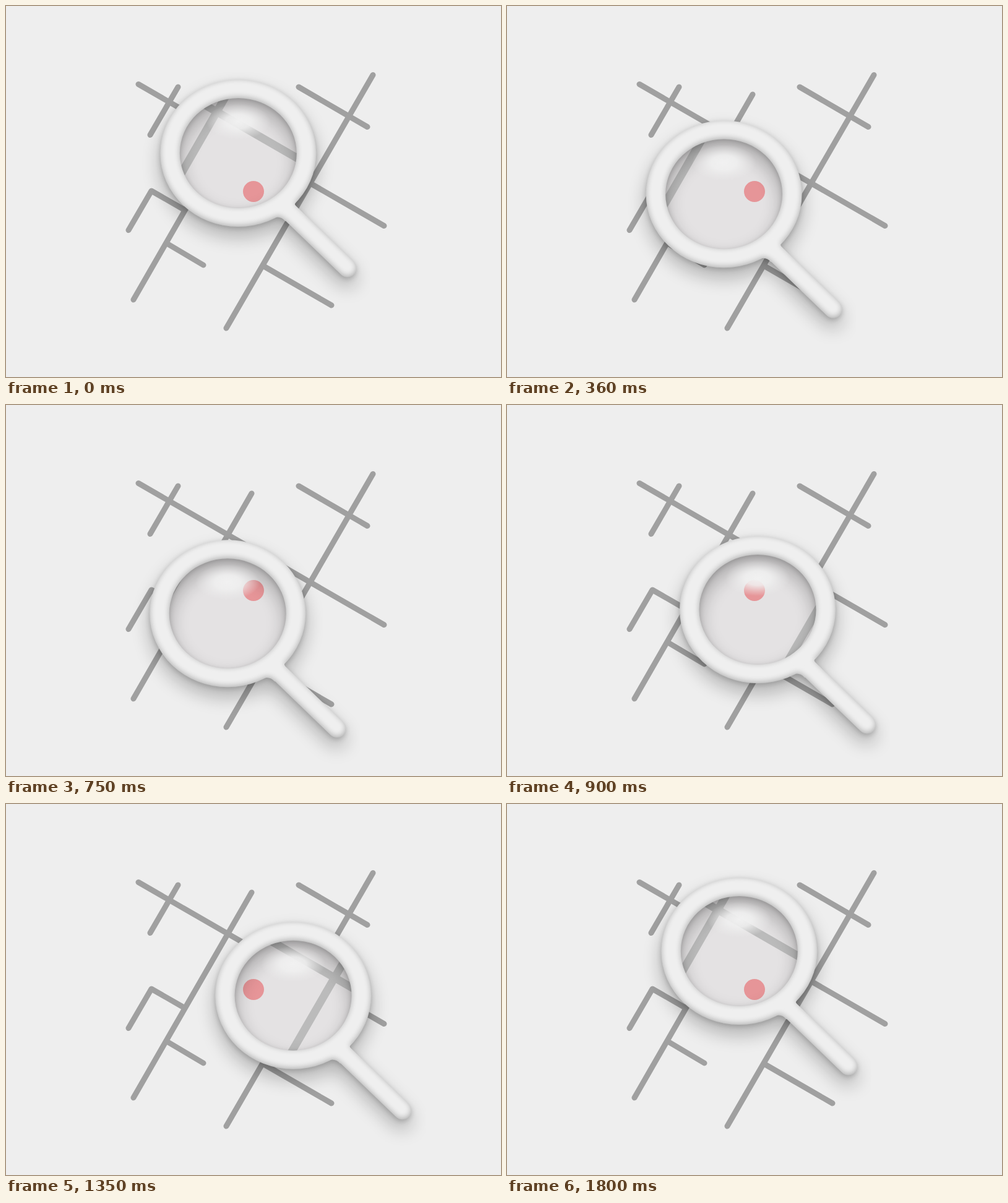
Animation, 800 px wide and 600 px high, one loop 2250 ms. Source, as an HTML page without scripts:

```html
<!DOCTYPE html>
<html lang="en">
<head>
<meta charset="utf-8">
<title>Map search</title>
<style>
  @property --t { syntax: "<number>"; inherits: true; initial-value: 0; }

  html, body { margin: 0; width: 100%; height: 100%; overflow: hidden; background: #eee; }

  /* The lens eases through three stops; a, b and c are the eased progress of each leg. */
  svg {
    display: block; width: 800px; height: 600px;
    animation: clock 2250ms steps(75) -2ms infinite;
    --p: clamp(0, var(--t) / 600, 1);
    --q: clamp(0, (var(--t) - 600) / 615, 1);
    --r: clamp(0, (var(--t) - 1215) / 585, 1);
    --a: (var(--p) * var(--p) * (3 - 2 * var(--p)));
    --b: (var(--q) * var(--q) * (3 - 2 * var(--q)));
    --c: (var(--r) * var(--r) * (3 - 2 * var(--r)));
    --x: calc(1px * (375.3 - 38.1 * var(--a) + 140.8 * var(--b) - 102.7 * var(--c)));
    --y: calc(1px * (238 + 102.2 * var(--a) - 19.2 * var(--b) - 83 * var(--c)));
  }
  @keyframes clock { from { --t: 0; } to { --t: 2250; } }

  .lens { transform: translate(var(--x), var(--y)); }
  .fixed { transform: translate(calc(-1 * var(--x)), calc(-1 * var(--y))); }
  .roads { fill: none; stroke-width: 9; stroke-linecap: round; stroke-linejoin: round; }
</style>
</head>
<body>
<svg viewBox="0 0 800 600">
  <defs>
    <path id="roads" class="roads" d="M214 126.5L611 355.5M278 131L233 208.5M397 143L206 475M473 131L584 195.5
      M593 111.5L356 521M198 362.5L235 299L289 330M260 384L319 419M416 420.5L526 484"/>
    <g id="frame">
      <path fill-rule="evenodd" d="M-126 0A126 119 0 0 1 126 0A126 119 0 0 1 -126 0Z
        M-94.5 0A94.5 89 0 0 1 94.5 0A94.5 89 0 0 1 -94.5 0Z"/>
      <path d="M69 82L176.5 186" stroke="#efefef" stroke-width="29" stroke-linecap="round"/>
      <path d="M60 104Q69 102 76 110L98 92Q89 84 92 76Z"/>
    </g>
    <clipPath id="glass"><ellipse rx="95.5" ry="90"/></clipPath>
    <radialGradient id="shine">
      <stop offset="0" stop-color="#f1f1f1"/>
      <stop offset=".4" stop-color="#f0f0f0" stop-opacity=".88"/>
      <stop offset=".75" stop-color="#eee" stop-opacity=".35"/>
      <stop offset="1" stop-color="#eee" stop-opacity="0"/>
    </radialGradient>
    <filter id="shade" filterUnits="userSpaceOnUse" x="-166" y="-160" width="379" height="412" color-interpolation-filters="sRGB">
      <feGaussianBlur in="SourceAlpha" stdDeviation="15" result="far"/>
      <feOffset in="far" dy="16" result="low"/>
      <feComponentTransfer in="low" result="soft"><feFuncA type="linear" slope=".27"/></feComponentTransfer>
      <feGaussianBlur in="SourceAlpha" stdDeviation="4"/>
      <feOffset dy="3"/>
      <feComponentTransfer result="near"><feFuncA type="linear" slope=".2"/></feComponentTransfer>
      <feMerge><feMergeNode in="soft"/><feMergeNode in="near"/></feMerge>
    </filter>
    <filter id="bevel" filterUnits="userSpaceOnUse" x="-166" y="-160" width="379" height="412" color-interpolation-filters="sRGB">
      <feComponentTransfer in="SourceAlpha"><feFuncA type="table" tableValues="1 0"/></feComponentTransfer>
      <feGaussianBlur stdDeviation="5"/>
      <feOffset dy="-2"/>
      <feComponentTransfer><feFuncA type="linear" slope=".27"/></feComponentTransfer>
      <feComposite in2="SourceAlpha" operator="in" result="rim"/>
      <feMerge><feMergeNode in="SourceGraphic"/><feMergeNode in="rim"/></feMerge>
    </filter>
  </defs>

  <rect width="800" height="600" fill="#eee"/>
  <use href="#roads" stroke="#a0a0a0"/>

  <g class="lens">
    <g clip-path="url(#glass)">
      <ellipse rx="96" ry="91" fill="#e4e2e3"/>
      <g class="fixed">
        <use href="#roads" stroke="#bbb" transform="translate(400 300) scale(1.43) translate(-400 -300)"/>
        <circle cx="400" cy="300" r="17" fill="#e69598"/>
      </g>
    </g>
    <use href="#frame" filter="url(#shade)"/>
    <ellipse cy="-51" rx="52" ry="29" fill="url(#shine)"/>
    <use href="#frame" fill="#efefef" filter="url(#bevel)"/>
  </g>
</svg>
</body>
</html>
```
